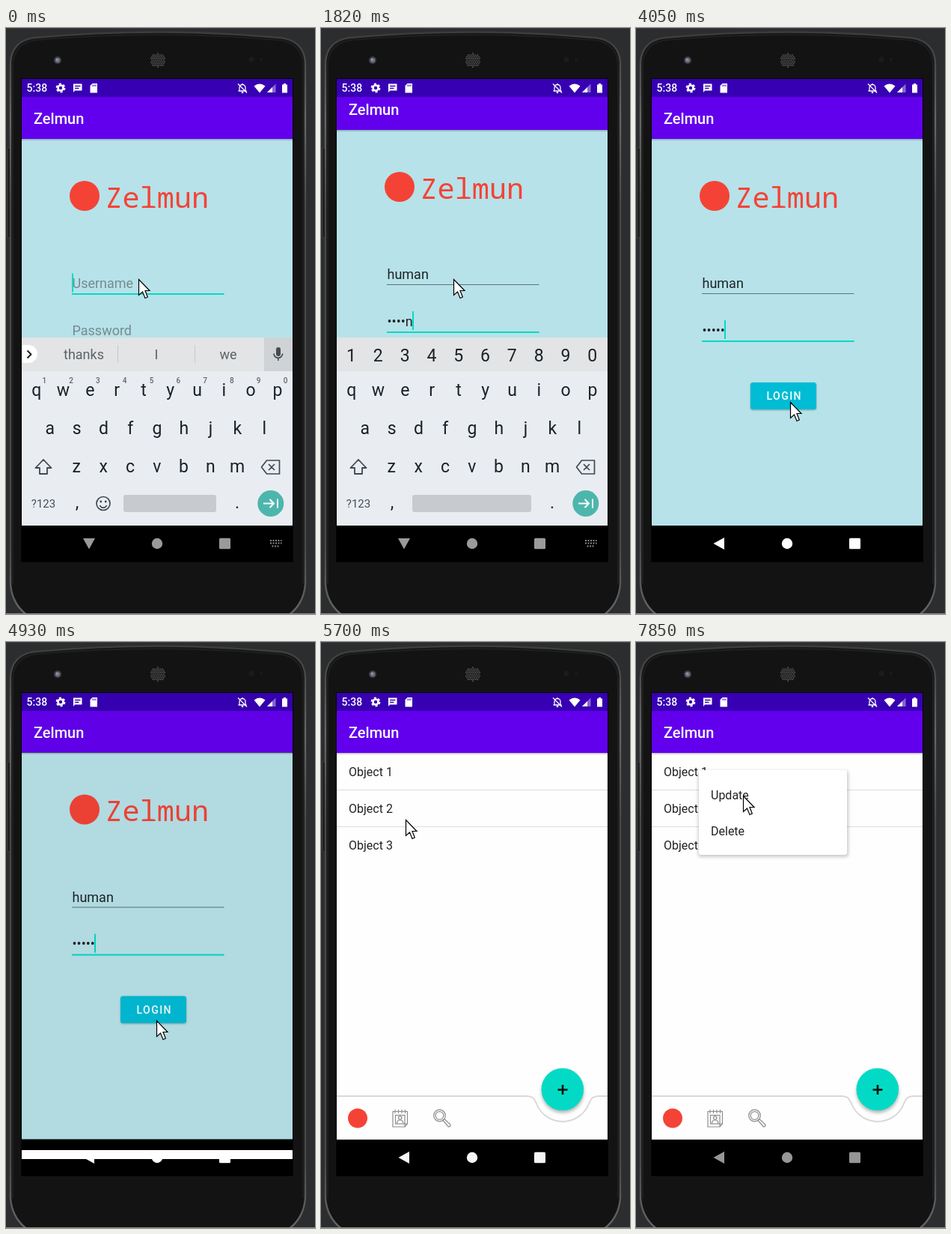
These frames come from a looping animation (413x782 px, 8000 ms). An HTML page:

```html
<!DOCTYPE html>
<html lang="en">
<head>
<meta charset="utf-8">
<title>Login and list demo</title>
<style>
  html, body { margin: 0; width: 100%; height: 100%; overflow: hidden; background: #2b2d2e; }
  svg { display: block; width: 413px; height: 782px; font-family: Roboto, sans-serif; }
  text { white-space: pre; }
  .mid { text-anchor: middle; }
  .bar { font-size: 20px; font-weight: 500; fill: #fff; }
  .item { font-size: 16px; fill: #222; }
  .field { font-size: 18px; fill: #1d2426; }
  .hint { font-size: 18px; fill: #768b90; }
  .key { font-size: 23px; fill: #1a2227; text-anchor: middle; }
  .sup { font-size: 10px; fill: #5f676c; text-anchor: middle; font-weight: 500; }
  .sug { font-size: 18px; fill: #5c6266; text-anchor: middle; }
  .line { fill: none; stroke: #3f484d; stroke-width: 2; stroke-linejoin: round; }
  .thin { fill: none; stroke: #8d8d8d; stroke-width: 1.2; }
</style>
</head>
<body>
<svg viewBox="0 0 413 782" xmlns="http://www.w3.org/2000/svg">
  <defs>
    <clipPath id="screen"><rect x="21" y="68" width="362" height="644"/></clipPath>
    <clipPath id="content"><rect x="21" y="68" width="362" height="596"/></clipPath>
    <clipPath id="reveal"><rect id="revealBox" x="21" y="68" width="362" height="644"/></clipPath>
    <clipPath id="row"><rect x="21" y="149" width="362" height="48"/></clipPath>
    <filter id="soft" x="-30%" y="-30%" width="160%" height="160%"><feGaussianBlur stdDeviation="2"/></filter>
    <filter id="crisp" x="-10%" y="-20%" width="120%" height="140%"><feGaussianBlur stdDeviation="1"/></filter>
    <linearGradient id="fall" x1="0" y1="0" x2="0" y2="1">
      <stop offset="0" stop-opacity=".25"/><stop offset="1" stop-opacity="0"/>
    </linearGradient>
    <linearGradient id="rim" x1="0" y1="0" x2="0" y2="1">
      <stop offset="0" stop-color="#3c3c3c"/><stop offset=".15" stop-color="#666"/>
      <stop offset=".3" stop-color="#484848"/><stop offset=".88" stop-color="#484848"/>
      <stop offset="1" stop-color="#666"/>
    </linearGradient>
  </defs>

  <!-- handset -->
  <rect width="413" height="782" fill="#2b2d2e"/>
  <rect width="413" height="1" fill="#3c3f41"/>
  <path d="M5 160H2V280H5" fill="#1a1a1a" stroke="#414141"/>
  <path d="M6 742V46Q8 17 38 13Q203 -2 367 13Q398 17 400 46V742Q398 769 377 784H29Q8 769 6 742Z" fill="#131313" stroke="url(#rim)" stroke-width="2.400"/>
  <path d="M9 742V48Q11 20 40 16Q203 2 365 16Q395 20 397 48V742" fill="none" stroke="#1f1f1f" stroke-width="2"/>
  <rect y="781" width="413" height="1" fill="#8a8a8a"/>
  <circle cx="69" cy="43" r="5" fill="#3d4047"/>
  <circle cx="69" cy="43" r="3" fill="#737887"/>
  <circle cx="68" cy="42" r="1" fill="#a8adb8"/>
  <circle cx="328" cy="42" r="3.5" fill="#1c1c1c"/>
  <circle cx="341" cy="42" r="2" fill="#1c1c1c"/>
  <g id="speaker" fill="#666"></g>
  <rect x="20" y="67" width="364" height="646" fill="#050505"/>

  <g clip-path="url(#screen)">
    <g clip-path="url(#content)">
      <g id="login">
        <rect x="21" y="148" width="362" height="516" fill="#b7e2e9"/>
        <rect x="21" y="92" width="362" height="56" fill="#6200ee"/>
        <rect x="21" y="148" width="362" height="3" fill="url(#fall)"/>
        <text class="bar" x="37" y="128">Zelmun</text>
        <circle cx="105" cy="224" r="20" fill="#f44336"/>
        <text x="132.5" y="239.500" font-size="38.500" fill="#f44336" font-family="'Noto Sans Mono', monospace">Zelmun</text>
        <text class="hint" id="userHint" x="88.5" y="347">Username</text>
        <text class="field" id="user" x="88.5" y="347"></text>
        <rect id="userLine" x="88" width="203.500" y="354"/>
        <text class="hint" id="passHint" x="88.5" y="409.500">Password</text>
        <text class="field" id="pass" x="88.5" y="409.500"></text>
        <rect id="passLine" x="88" width="203.500" y="417"/>
        <rect id="caret" width="2" height="25" fill="#03dac5"/>
        <rect x="153" y="474" width="88" height="36" rx="3" opacity=".3" filter="url(#crisp)"/>
        <rect x="153" y="473" width="88" height="36" rx="3.500" fill="#00bcd4"/>
        <rect id="press" x="153" y="473" width="88" height="36" rx="3.500" fill="#fff"/>
        <text class="mid" x="198.200" y="496" font-size="14" font-weight="500" letter-spacing="1.450" fill="#fff">LOGIN</text>
      </g>
      <rect x="21" y="68" width="362" height="24" fill="#3700b3"/>
      <rect id="dim" x="21" y="68" width="362" height="596"/>
      <g id="keyboard">
        <rect x="21" y="413" width="362" height="251" fill="#e9edf1"/>
        <rect x="21" y="413" width="362" height="45" fill="#e2e4e6"/>
        <g id="words">
          <path d="M21 423H30A12 12 0 0 1 30 447H21Z" fill="#fff"/>
          <path d="M28.500 430.500l5 5-5 5" class="line" style="stroke:#222"/>
          <path d="M149.500 423v24M252.500 423v24" stroke="#c6c9cb"/>
          <rect x="345" y="413" width="38" height="45" fill="#cfd3d6"/>
          <rect x="361" y="426" width="6" height="12" rx="3" fill="#454d52"/>
          <path d="M358 434.500a5.800 5.800 0 0 0 11.600 0M363.800 440v4" class="line" style="stroke-width:1.600"/>
          <g id="sups"></g>
          <circle cx="130" cy="634.500" r="9" class="line" style="stroke-width:1.700"/>
          <path d="M125.500 637a4.800 4.800 0 0 0 9 0" class="line" style="stroke-width:1.600"/>
          <circle cx="126.800" cy="632" r="1.400" fill="#3f484d"/>
          <circle cx="133.200" cy="632" r="1.400" fill="#3f484d"/>
        </g>
        <g id="digits"></g>
        <g id="keys"></g>
        <path d="M50 576l-10.500 11h5.500v8h10v-8h5.500z" class="line" style="stroke-width:1.800"/>
        <path d="M341.500 586l7-9h17v18h-17zM351 582l8 8m0-8l-8 8" class="line" style="stroke-width:1.700"/>
        <text class="mid" x="50" y="640" font-size="15" fill="#454e54">?123</text>
        <text class="key" x="95" y="641">,</text>
        <text class="key" x="309" y="641">.</text>
        <rect id="space" y="623" height="23" rx="3" fill="#c7cbcf"/>
        <circle cx="353.800" cy="634.500" r="17.500" fill="#4db6ac"/>
        <path d="M344 634.500h14m-5.500-5.500l5.500 5.500l-5.500 5.500M363 628.500v12" fill="none" stroke="#fff" stroke-width="2"/>
      </g>
    </g>
    <rect x="21" y="664" width="362" height="48"/>
    <rect id="navPress" x="61" y="664" width="100" height="48" rx="24" fill="#1f1f1f"/>

    <g clip-path="url(#reveal)" id="mainWrap">
      <g id="main">
        <rect x="21" y="68" width="362" height="596" fill="#fefefe"/>
        <rect x="21" y="664" width="362" height="80"/>
        <rect x="21" y="68" width="362" height="24" fill="#3700b3"/>
        <rect x="21" y="92" width="362" height="56" fill="#6200ee"/>
        <rect x="21" y="148" width="362" height="3" fill="url(#fall)"/>
        <text class="bar" x="37" y="128">Zelmun</text>
        <circle id="ripple" cx="202" cy="173" clip-path="url(#row)"/>
        <text class="item" x="37" y="179">Object 1</text>
        <text class="item" x="37" y="228">Object 2</text>
        <text class="item" x="37" y="277">Object 3</text>
        <path d="M21 197.500H383M21 246.500H383" stroke="#dcdcdc"/>
        <path d="M21 606H274C284 606 285 610 288 616A37.500 37.500 0 0 0 358 616C361 610 362 606 372 606H383" fill="none" stroke="#d9d9d9" stroke-width="2"/>
        <circle cx="323" cy="600" r="28.500" opacity=".28" filter="url(#soft)"/>
        <circle cx="322.800" cy="597" r="28.300" fill="#03dac5"/>
        <path d="M316.500 597.500h13m-6.500-6.500v13" stroke="#111" stroke-width="2.600"/>
        <circle cx="49" cy="635.500" r="13" fill="#f44336"/>
        <g class="thin">
          <path d="M96 626.500h19.500v16.500l-3.500 4h-16zM112 647v-4h3.500M99 624v5m4.500-5v5m4.500-5v5m4.500-5v5"/>
          <rect x="99.500" y="631.500" width="12.500" height="11.500"/>
          <circle cx="105.700" cy="635" r="2.200"/>
          <path d="M101.500 642.500q0-4.500 4.200-4.500t4.200 4.500"/>
          <circle cx="158.500" cy="632" r="7.800"/>
          <circle cx="158.500" cy="632" r="5.400"/>
          <path d="M163 638.500l2-2 8 7.500q.5 2.500-2.500 3z"/>
        </g>
        <g id="popup">
          <rect x="83" y="172" width="201" height="115" rx="4" opacity=".2" filter="url(#soft)"/>
          <rect x="84" y="171" width="198" height="113" rx="3" fill="#fff"/>
          <text class="item" x="100" y="209.500">Update</text>
          <text class="item" x="100" y="257.500">Delete</text>
        </g>
      </g>
    </g>

    <g id="nav">
      <path id="back" d="M-7.500 0L7 -8V8Z"/>
      <circle cx="202" cy="688" r="7.200"/>
      <rect x="285" y="680.800" width="15" height="14.500" rx="1.500"/>
    </g>
    <path id="imeIcon" d="M353 684h15.500m-15.500 3.500h15.500M355.500 691.500h10" stroke="#8a8a8a" stroke-width="2" stroke-dasharray="2 1.500"/>

    <!-- status bar -->
    <g fill="#fff">
      <text x="27.500" y="85" font-size="14" font-weight="500">5:38</text>
      <circle cx="73" cy="80" r="3.500" fill="none" stroke="#fff" stroke-width="2.600"/>
      <circle cx="73" cy="80" r="5.400" fill="none" stroke="#fff" stroke-width="2" stroke-dasharray="3 2.650"/>
      <path d="M90 74.500h11.500v9h-9.500l-2 2.500z"/>
      <path d="M92 77.500h7.500M92 80.500h5.500" stroke="#3700b3" stroke-width="1.300"/>
      <path d="M115.500 74h6.500v12.500h-9.500v-9.500z"/>
      <path d="M116 75.500v2.500m2-2.500v2.500m2-2.500v2.500" stroke="#3700b3" stroke-width=".9"/>
      <path d="M310.500 84h11M312 84v-4.500a4 4 0 0 1 8 0v4.500M316 74v1.500M310 74.500l12 12" fill="none" stroke="#fff" stroke-width="1.300"/>
      <circle cx="316" cy="86" r="1.300"/>
      <path d="M331.500 77.500q7.500-6 15 0l-7.500 9z"/>
      <path d="M360.500 74.500v11.500h-11.500z" opacity=".4"/>
      <path d="M356 79v7h-7z"/>
      <path d="M369 75.500h2v-1.500h3v1.500h2v11h-7z"/>
    </g>
  </g>

  <path id="mouse" d="M.5 .5V21.500L5.500 17L9 25.500L12.300 24L9 15.500H15Z" fill="#fff" stroke="#000" stroke-width="1.200"/>
</svg>

<script>
const LOOP = 8000;
const $ = id => document.getElementById(id);
const set = (id, attrs) => { for (const k in attrs) $(id).setAttribute(k, attrs[k]); };
const show = (id, on) => set(id, { visibility: on ? 'visible' : 'hidden' });

function add(parent, tag, attrs, text = '') {
  const node = document.createElementNS('http://www.w3.org/2000/svg', tag);
  for (const k in attrs) node.setAttribute(k, attrs[k]);
  node.textContent = text;
  return $(parent).appendChild(node);
}

// Key rows and speaker mesh
const PITCH = 35.8;
const keyRow = (parent, chars, x, y, cls = 'key') =>
  [...chars].forEach((c, i) => add(parent, 'text', { class: cls, x: x + i * PITCH, y }, c));

keyRow('digits', '1234567890', 40.5, 445);
keyRow('sups', '1234567890', 51.3, 474, 'sup');
keyRow('keys', 'qwertyuiop', 40.7, 491);
keyRow('keys', 'asdfghjkl', 58.8, 542);
keyRow('keys', 'zxcvbnm', 94.3, 593);
const words = [104, 201, 297].map(x => add('words', 'text', { class: 'sug', x, y: 442 }));

for (let r = -4; r <= 4; r++)
  for (let c = -5; c <= 5; c++) {
    const x = c * 2.6 + (r & 1) * 1.3, y = r * 2.3;
    if (Math.hypot(x, y) < 9.5) add('speaker', 'circle', { cx: 203 + x, cy: 43 + y, r: .85 });
  }

// Step tables: [start in ms, ...values]
const MOUSE = [
  [0, 177, 335], [2550, 168, 402], [2690, 156, 480], [2810, 140, 570], [2930, 126, 650], [3050, 122, 681],
  [3630, 160, 653], [3780, 222, 560], [3910, 214, 500], [4050, 206, 499], [4170, 204, 501], [4290, 203, 503],
  [4410, 202, 504], [4530, 201, 505], [5460, 160, 420], [5580, 60, 290], [5700, 113, 237], [5820, 108, 197],
  [5970, 96, 182], [6090, 88, 175], [6210, 84, 171], [7210, 86, 180], [7330, 95, 192], [7450, 108, 200],
  [7570, 119, 204], [7850, 143, 205]
];
const USER = [
  [0, '', 'thanks I we'], [400, 'h', 'he h how'], [550, 'hu', 'hub hu hug'], [670, 'hum', 'hums hum hung'],
  [820, 'huma', 'human huma hum'], [970, 'human', 'humans human humane']
];
const PASS = [[0, ''], [1400, 'h'], [1520, '•u'], [1670, '•••a'], [1820, '••••n'], [2550, '•••••']];
const CARET = [[0, 1], [120, 0], [400, 1], [2550, 0], [2690, 1], [3330, 0], [3780, 1]];
const PAN = [[0, 0], [1100, -6], [1250, -12], [3480, -.5], [3630, 0], [4930, -.5], [5070, -8]];
const PRESS = [[0, 0], [4530, .1], [4800, .22], [4930, 0]];
const OPEN = [[4930, 26, 678], [5070, 4, 152], [5200, 1, 80], [5320, 0, 68]];
const RIPPLE = [[0, 0, 0], [6360, 124, .1], [6510, 185, .12], [6640, 185, .14], [7090, 185, .06], [7210, 0, 0]];
const POPUP = [[0, 0], [7090, .6], [7210, 1]];

const at = (table, t) => table.reduce((cur, step) => step[0] <= t ? step : cur).slice(1);

function underline(id, focused) {
  set(id, { height: focused ? 2 : 1, fill: focused ? '#03dac5' : '#5d7377' });
}

function drawLogin(t) {
  const [user, list] = at(USER, t), [pass] = at(PASS, t);
  const onPass = t >= 1100;
  $('user').textContent = user;
  $('pass').textContent = pass;
  show('userHint', !user);
  show('passHint', !pass);
  underline('userLine', !onPass);
  underline('passLine', onPass);
  const width = $(onPass ? 'pass' : 'user').getComputedTextLength();
  set('caret', { x: Math.round(88 + width), y: onPass ? 390 : 327.5, opacity: at(CARET, t)[0] });
  set('press', { opacity: at(PRESS, t)[0] });
  set('login', { transform: `translate(0 ${at(PAN, t)[0]})` });
  set('dim', { opacity: t >= 4930 ? .035 : 0 });
  list.split(' ').forEach((w, i) => words[i].textContent = w);
}

function drawKeyboard(t) {
  const numeric = t >= 1250, left = numeric ? 122 : 157;
  $('keyboard').style.display = t < 3630 ? '' : 'none';
  set('keyboard', { transform: `translate(0 ${t >= 3480 ? 150 : 0})` });
  show('words', !numeric);
  show('digits', numeric);
  set('space', { x: left, width: 281 - left });
}

function drawNav(t) {
  const fade = Math.min(1, Math.max(0, (t - 5600) / 1000));
  const grey = t < 3330 ? 154 : t < 3480 ? 168 : t < 3630 ? 210 : Math.round(255 - 105 * fade);
  const turn = t < 3480 ? -90 : t < 3630 ? -40 : 0;
  set('nav', { fill: `rgb(${grey},${grey},${grey})` });
  set('back', { transform: `translate(111 688) rotate(${turn})` });
  show('navPress', t >= 3330 && t < 3480);
  show('imeIcon', t < 3480);
}

function drawMain(t) {
  const open = t >= OPEN[0][0];
  $('mainWrap').style.display = open ? '' : 'none';
  if (!open) return;
  const [shift, top] = at(OPEN, t), [r, opacity] = at(RIPPLE, t);
  set('main', { transform: `translate(0 ${shift})` });
  set('revealBox', { y: top, height: 712 - top });
  set('ripple', { r, opacity });
  set('popup', { opacity: at(POPUP, t)[0] });
}

function draw(now) {
  const t = now % LOOP;
  drawLogin(t);
  drawKeyboard(t);
  drawNav(t);
  drawMain(t);
  set('mouse', { transform: `translate(${at(MOUSE, t).join(' ')})` });
}

const start = performance.now();
function tick() {
  draw(performance.now() - start);
  requestAnimationFrame(tick);
}
tick();
</script>
</body>
</html>
```
